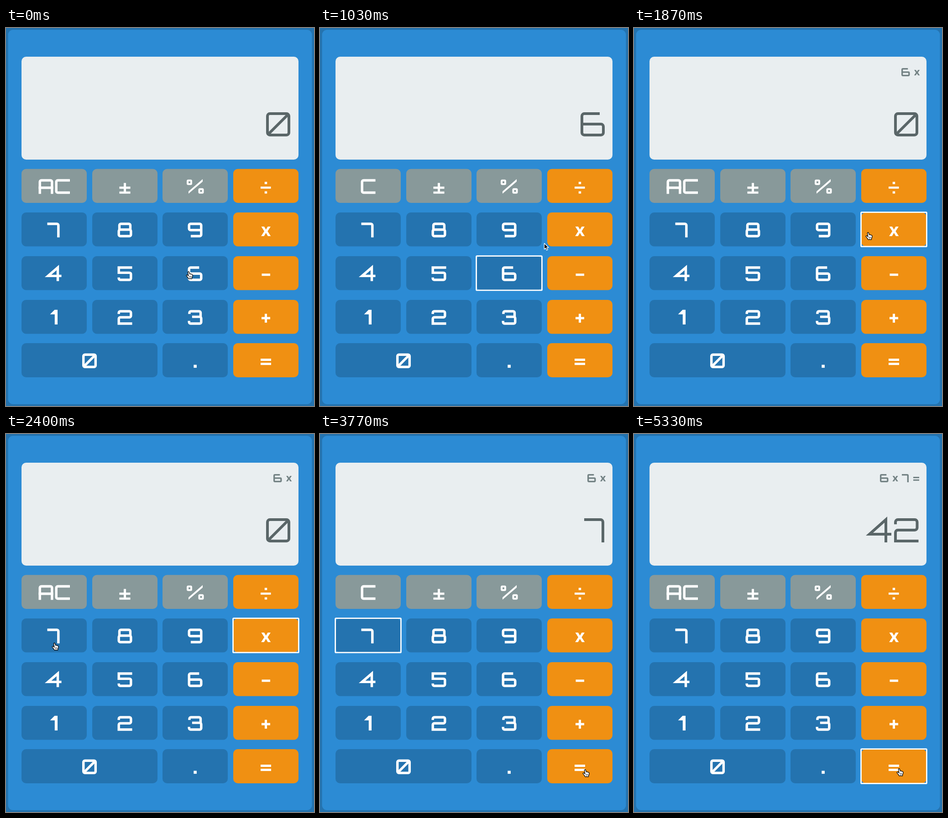
Animation, 675 px wide and 830 px high, one loop 5360 ms. Source, as an HTML page with a canvas:

```html
<!DOCTYPE html>
<html lang="en">
<head>
<meta charset="utf-8">
<title>Calculator</title>
<style>
  html, body { margin: 0; width: 100%; height: 100%; overflow: hidden; background: #2473af; }
  canvas { display: block; }
</style>
</head>
<body>
<canvas id="stage" width="675" height="830" role="img" aria-label="Calculator: 6 x 7 = 42"></canvas>
<script>
const ctx = document.getElementById('stage').getContext('2d');
const LOOP = 5360;
const BLUE = '#2473af', PANEL = '#2c8bd4', GREY = '#88999a', ORANGE = '#f09012';
const INK = '#5a6668', FAINT = '#738284';

// Centre lines in a unit box; a third value of 1 keeps the corner sharp.
const GLYPHS = {
  0: ['0 .5 0 0 1 0 1 1 0 1 0 .5', '.04 .96 .96 .04'],
  2: ['0 .22 0 0 1 0 1 .49 0 .49 0 1! 1 1'],
  3: ['.03 .22 .03 0 .95 0 .95 .45', '.25 .45 1 .45 1 1 0 1 0 .78'],
  4: ['.8 1 .8 0! 0 .68! 1 .68'],
  5: ['1 0 0 0! 0 .42! 1 .42 1 1 0 1 0 .8'],
  6: ['.83 0 0 0 0 1 1 1 1 .49 0 .49'],
  7: ['0 0 1 0 1 1'],
  8: ['.05 .47 .05 0 .95 0 .95 .47', '0 .7 0 .47 1 .47 1 1 0 1 0 .7'],
  9: ['1 .51 0 .51 0 0 1 0 1 1 .14 1'],
  A: ['0 1 0 0 1 0 1 1', '0 .6 1 .6'],
  C: ['1 0 0 0 0 1 1 1']
};

function parse(line) {
  const parts = line.split(' '), pts = [];
  for (let i = 0; i < parts.length; i += 2)
    pts.push({ x: +parts[i], y: parseFloat(parts[i + 1]), sharp: parts[i + 1].endsWith('!') });
  return pts;
}
for (const ch in GLYPHS) GLYPHS[ch] = GLYPHS[ch].map(parse);

function glyph(ch, x, y, w, h, lw, color) {
  const px = p => x + lw / 2 + p.x * (w - lw);
  const py = p => y + lw / 2 + p.y * (h - lw);
  const r = h * 0.1;
  ctx.strokeStyle = color;
  ctx.lineWidth = lw;
  ctx.lineJoin = 'miter';
  // open ends reach the edge of the box
  for (const pts of GLYPHS[ch]) {
    const n = pts.length - 1;
    ctx.beginPath();
    pts.forEach((p, i) => {
      let gx = px(p), gy = py(p);
      if (i === 0 || i === n) {
        const q = pts[i ? n - 1 : 1];
        if (p.y === q.y && (p.x === 0 || p.x === 1)) gx += Math.sign(p.x - q.x) * lw / 2;
        if (p.x === q.x && p.y === 1) gy += lw / 2;
      }
      if (i === 0) ctx.moveTo(gx, gy);
      else if (i === n || p.sharp) ctx.lineTo(gx, gy);
      else ctx.arcTo(gx, gy, px(pts[i + 1]), py(pts[i + 1]), r);
    });
    ctx.stroke();
  }
}

function box(x, y, w, h, r, color) {
  ctx.fillStyle = color;
  ctx.beginPath();
  ctx.roundRect(x, y, w, h, r);
  ctx.fill();
}

const bar = (x, y, w, h, color = '#fff') => box(x, y, w, h, 0, color);

function times(x, y, size, color) {
  ctx.font = `700 ${size}px "Open Sans", "Noto Sans", sans-serif`;
  ctx.textAlign = 'center';
  ctx.textBaseline = 'alphabetic';
  ctx.fillStyle = color;
  ctx.fillText('x', x, y);
}

const COLS = [34, 189, 343, 498];
const ROWS = [309.5, 405, 501, 597, 692];
const LABELS = ['C±%÷', '789x', '456-', '123+', '0 .='];
const keys = [];
LABELS.forEach((row, r) => [...row].forEach((id, c) => {
  if (id === ' ') return;
  keys.push({
    id, x: COLS[c], y: ROWS[r], w: id === '0' ? 298 : 143, h: r === 4 ? 75 : 74.5,
    color: c === 3 ? ORANGE : r === 0 ? GREY : BLUE
  });
}));

// Symbols are drawn around the middle of their key.
const SYMBOLS = {
  '±': () => {
    bar(-12, 1.5, 24, 4.8);
    bar(-2.5, -6.5, 5, 19);
    bar(-12, 12.3, 24, 4.7);
  },
  '%': () => {
    ctx.strokeStyle = '#fff';
    ctx.lineWidth = 4;
    ctx.beginPath();
    ctx.roundRect(-16.5, -12, 8, 8, 1.5);
    ctx.roundRect(9, 7, 8, 8, 1.5);
    ctx.stroke();
    ctx.fillStyle = '#fff';
    ctx.beginPath();
    ctx.moveTo(-14.5, 17);
    ctx.lineTo(-14.5, 12);
    ctx.lineTo(16.5, -15);
    ctx.lineTo(16.5, -9.5);
    ctx.fill();
  },
  '÷': () => {
    bar(-11.5, 1.5, 22.5, 4.5);
    bar(-2.7, -9, 5.4, 5);
    bar(-2.7, 11.8, 5.4, 5);
  },
  'x': () => times(0.2, 14.8, 37, '#fff'),
  '-': () => bar(-9, 1, 18.5, 5),
  '+': () => {
    bar(-9.5, 0.3, 19, 5);
    bar(-2.5, -6.7, 5, 19.5);
  },
  '=': () => {
    bar(-11.5, -3.5, 23, 5);
    bar(-11.5, 5.5, 23, 5);
  },
  '.': () => bar(-3.2, 10, 6.6, 6.6),
  '1': () => {
    ctx.fillStyle = '#fff';
    ctx.beginPath();
    [[-9, -5.5], [1, -15.5], [7.5, -15.5], [7.5, 16.8], [1.3, 16.8], [1.3, -5.5]]
      .forEach(p => ctx.lineTo(...p));
    ctx.fill();
  }
};

function drawKey(k, fresh) {
  box(k.x, k.y, k.w, k.h, 10, k.color);
  ctx.save();
  ctx.translate(k.x + k.w / 2, k.y + k.h / 2);
  const top = -15;
  if (SYMBOLS[k.id]) SYMBOLS[k.id]();
  else if (k.id === 'C' && fresh) {
    glyph('A', -34, top, 32, 32.5, 5.4, '#fff');
    glyph('C', 2, top, 32.5, 32.5, 5.4, '#fff');
  } else {
    const w = k.id === '7' ? 27 : 32;
    glyph(k.id, k.id === '7' ? -15 : -16, top, w, 32.5, 5.4, '#fff');
  }
  ctx.restore();
}

function ring(id) {
  const k = keys.find(k => k.id === id);
  if (!k) return;
  ctx.strokeStyle = '#fff';
  ctx.lineWidth = 2.8;
  ctx.beginPath();
  ctx.roundRect(k.x - 0.4, k.y - 0.4, k.w + 0.8, k.h + 0.8, 1.5);
  ctx.stroke();
}

const small = (ch, x, w) => glyph(ch, x, 88, w, 18, 3.3, FAINT);

const SCREENS = {
  zero: () => glyph('0', 570, 185, 53, 53, 6, INK),
  six: () => glyph('6', 571, 185, 53, 53, 6, INK),
  seven: () => glyph('7', 579, 185, 44, 53, 6, INK),
  answer: () => {
    glyph('4', 513, 185, 51, 53, 6, INK);
    glyph('2', 570, 185, 53.5, 53, 6, INK);
  }
};
const HISTORY = {
  none: () => {},
  open: () => {
    small('6', 586, 18.5);
    times(620, 104, 22, FAINT);
  },
  done: () => {
    small('6', 539, 18.5);
    times(572.6, 104, 22, FAINT);
    small('7', 587, 15);
    bar(612, 94, 13, 3, FAINT);
    bar(612, 99.7, 13, 3, FAINT);
  }
};

// start time, number, history, fresh entry (AC rather than C)
const STATES = [
  [0, 'zero', 'none', true],
  [430, 'six', 'none', false],
  [1690, 'zero', 'open', true],
  [2920, 'seven', 'open', false],
  [4000, 'answer', 'done', true]
];
const FOCUS = [[0, ''], [340, '6'], [1600, 'x'], [2830, '7'], [3910, '=']];
const at = (list, t) => list.findLast(s => t >= s[0]);

// time, pointer tip x, y
const PATH = [
  [0, 400, 535], [860, 400, 535], [1030, 491, 473], [1120, 513, 449],
  [1930, 513, 449], [2160, 240, 456], [2340, 106, 459], [3130, 106, 459],
  [3230, 174, 489], [3300, 335, 600], [3460, 581, 737], [3870, 581, 737],
  [3960, 581, 735], [LOOP, 581, 735]
];

function slope(i, a) {
  const p = PATH[i - 1], c = PATH[i], n = PATH[i + 1];
  if (!p || !n || p[a] === c[a] || n[a] === c[a]) return 0;
  return (n[a] - p[a]) / (n[0] - p[0]);
}

function pointer(t) {
  const i = Math.min(PATH.findLastIndex(k => t >= k[0]), PATH.length - 2);
  const p = PATH[i], n = PATH[i + 1], d = n[0] - p[0], u = (t - p[0]) / d;
  const s = u * u * (3 - 2 * u);
  return [1, 2].map(a => p[a] + (n[a] - p[a]) * s
    + d * u * (1 - u) * ((1 - u) * slope(i, a) - u * slope(i + 1, a)));
}

const HAND = new Path2D('M-1.6 1.2C-1.2-.4 1-.4 1.5 1.2L2.5 5Q4.2 3.9 4.9 5.4Q6.6 4.7 7.2 6.2' +
  'Q9 6 9 8.2Q9 11 7.6 12.8L7.4 15.6H4.4L3.6 14.6L2.6 15.6H.2Q-1 13.2-2.6 11.4' +
  'Q-5.2 8.8-4.6 7.8Q-3.6 6.4-1.6 8L-.2 9.2Z');
const ARROW = new Path2D('M0 0V13.2L3.1 10.4L5.2 15.3L7.6 14.3L5.5 9.5H9.6Z');

function drawPointer(x, y) {
  const over = keys.some(k => x >= k.x && x <= k.x + k.w && y >= k.y && y <= k.y + k.h);
  const shape = over ? HAND : ARROW;
  ctx.save();
  ctx.translate(x, y);
  ctx.lineJoin = 'round';
  ctx.lineWidth = 1.3;
  ctx.fillStyle = over ? '#fff' : '#000';
  ctx.strokeStyle = over ? '#000' : '#fff';
  ctx.fill(shape);
  ctx.stroke(shape);
  if (over) {
    ctx.lineWidth = 0.8;
    ctx.beginPath();
    [2, 4, 6].forEach(cx => {
      ctx.moveTo(cx - 0.2, 9.6);
      ctx.lineTo(cx, 12.8);
    });
    ctx.stroke();
  }
  ctx.restore();
}

function draw() {
  const t = performance.now() % LOOP;
  const [, number, history, fresh] = at(STATES, t);
  bar(0, 0, 675, 830, BLUE);
  box(4.5, 4, 666, 822, 11, PANEL);
  box(34, 63, 607, 226, 10, '#e9eef0');
  SCREENS[number]();
  HISTORY[history]();
  keys.forEach(k => drawKey(k, fresh));
  ring(at(FOCUS, t)[1]);
  drawPointer(...pointer(t));
  requestAnimationFrame(draw);
}
draw();
</script>
</body>
</html>
```
